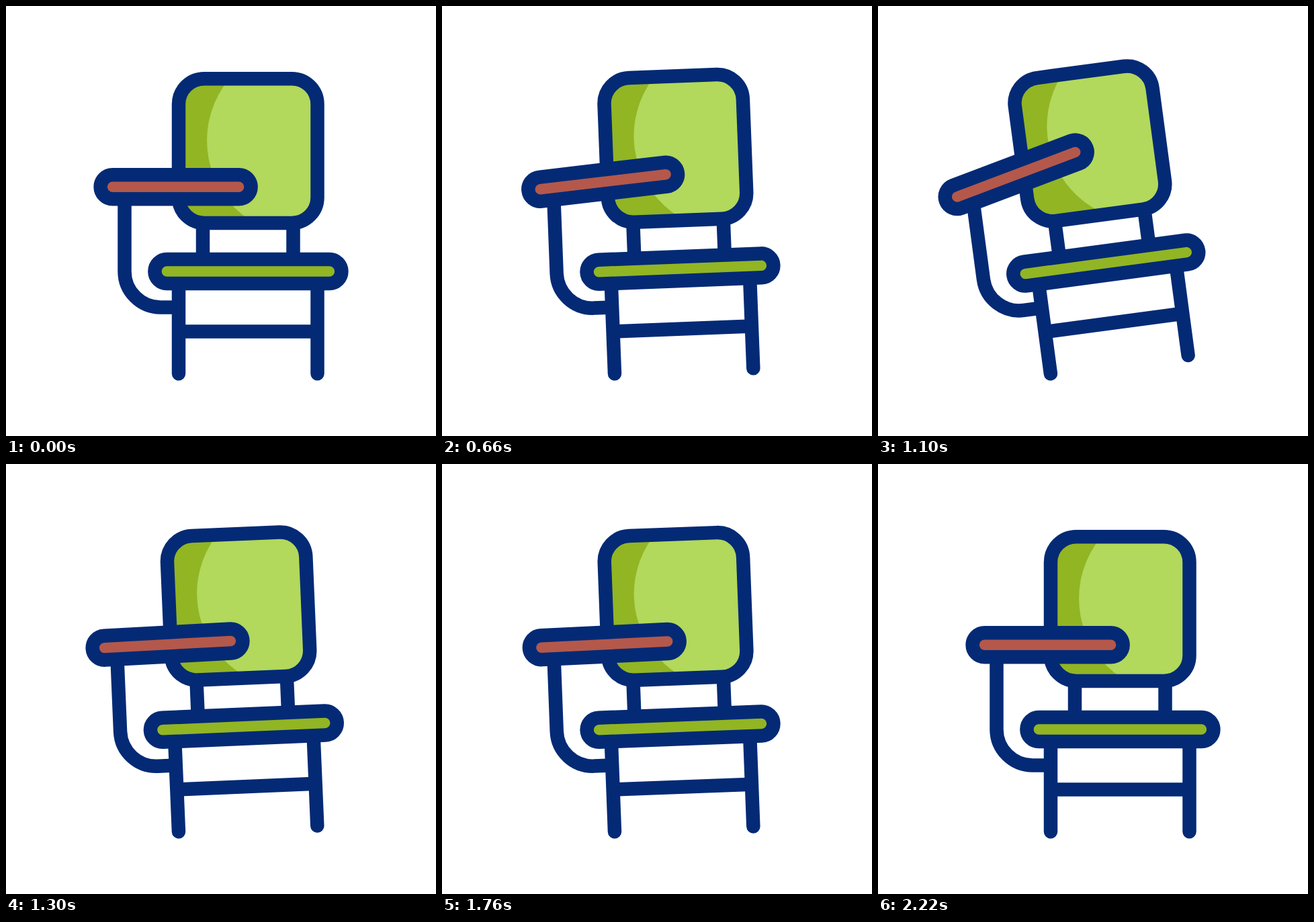
An HTML page for the animation above (2400 ms loop, 640x640 px).

```html
<!DOCTYPE html>
<html lang="en">
<head>
<meta charset="utf-8">
<title>School chair</title>
<style>
  html, body { margin: 0; width: 100%; height: 100%; overflow: hidden; background: #fff; }
  svg { display: block; width: 100%; height: 100%; }
  .line { fill: none; stroke: #042a75; stroke-width: 20.5; }
</style>
</head>
<body>
<svg viewBox="0 0 640 640">
  <clipPath id="panel"><rect x="257" y="108.2" width="206.5" height="214.8" rx="38"/></clipPath>
  <g id="chair">
    <g clip-path="url(#panel)">
      <rect x="257" y="108" width="207" height="216" fill="#92b524"/>
      <path d="M441 58a142 142 0 0 0 0 284h40V58z" fill="#b2d85c"/>
    </g>
    <rect class="line" x="257" y="108.2" width="206.5" height="214.8" rx="38"/>
    <path class="line" d="M293 323V377M427.5 323V377M257 484.5H463.5M176.5 285V395a53.5 53.5 0 0 0 53.5 53.5H257"/>
    <path class="line" stroke-linecap="round" d="M257 413V547.3M463.5 413V547.3"/>
    <rect class="line" x="221.4" y="376.9" width="278" height="36" rx="18" style="fill:#92b524"/>
    <rect id="tray" class="line" x="140.6" y="251.3" width="224" height="36" rx="18" style="fill:#b4584b"/>
  </g>
</svg>
<script>
const LOOP = 2400;
const chair = document.getElementById('chair');
const tray = document.getElementById('tray');

// Each key: [time, angle, x1, x2]; x1 and x2 shape the ease arriving at that key.
const chairKeys = [[400, 0], [985, -8.9, .6, .68], [1466, 0], [1730, -2.2], [2220, 0]];
const trayKeys = [[400, 0], [970, -19.5, .6, .8], [1440, 2.8, .2, .6], [1940, -2], [2220, 0]];

// cubic-bezier(x1, 0, x2, 1)
function ease(x, x1 = 1 / 3, x2 = 2 / 3) {
  let low = 0, high = 1;
  for (let i = 0; i < 24; i++) {
    const s = (low + high) / 2, r = 1 - s;
    if (3 * r * r * s * x1 + 3 * r * s * s * x2 + s * s * s < x) low = s;
    else high = s;
  }
  return low * low * (3 - 2 * low);
}

function angleAt(keys, time) {
  if (time <= keys[0][0]) return keys[0][1];
  const next = keys.findIndex(key => key[0] > time);
  if (next < 0) return keys[keys.length - 1][1];
  const [t0, a0] = keys[next - 1];
  const [t1, a1, x1, x2] = keys[next];
  return a0 + (a1 - a0) * ease((time - t0) / (t1 - t0), x1, x2);
}

function draw() {
  const time = performance.now() % LOOP;
  const tilt = angleAt(trayKeys, time);
  // The tray hinges on its left end when lifted and rocks on its right side on rebound.
  const pivot = tilt < 0 ? '150 289' : '291 321';
  chair.setAttribute('transform', `rotate(${angleAt(chairKeys, time)} 257 548)`);
  tray.setAttribute('transform', `rotate(${tilt} ${pivot})`);
  requestAnimationFrame(draw);
}
draw();
</script>
</body>
</html>
```
